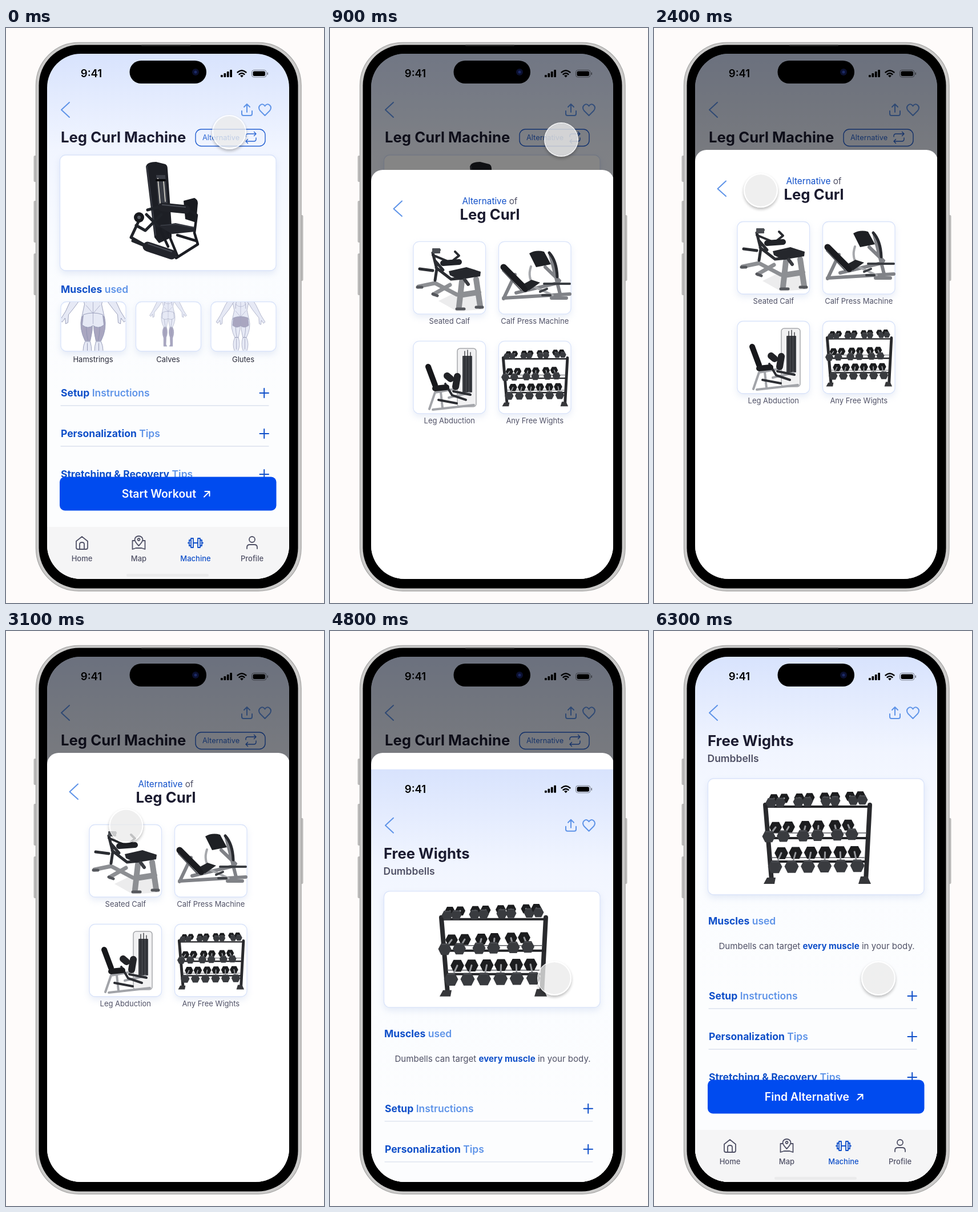
An HTML page for the animation above (6.4 s loop, 557 px wide and 1005 px high).

```html
<!DOCTYPE html>
<html lang="en">
<head>
<meta charset="utf-8">
<title>Workout app</title>
<style>
html, body { margin: 0; width: 100%; height: 100%; overflow: hidden; background: #fefbfa; }
svg { display: block; width: 557px; height: 1005px; font-family: Inter, Roboto, sans-serif; }
.line { fill: none; stroke-linecap: round; stroke-linejoin: round; }
.card { fill: #fff; stroke: #dae4fa; stroke-width: 1.3; filter: drop-shadow(0 5px 6px #6f8fd029); }
#touch {
  position: absolute; left: -30px; top: -30px; width: 60px; height: 60px; box-sizing: border-box;
  border: 2px solid #fffd; border-radius: 50%; background: #ebebebc8; background-clip: padding-box;
  box-shadow: 0 3px 5px #0004;
}
</style>
</head>
<body>
<svg id="stage" viewBox="0 0 557 1005"></svg>
<div id="touch"></div>
<script>
const INK = '#1b1b30', GREY = '#505166', BLUE = '#0f4fc9', SKY = '#5f94e8';

const text = (x, y, size, weight, fill, s, anchor = 'start') =>
  `<text x="${x}" y="${y}" font-size="${size}" font-weight="${weight}" fill="${fill}" text-anchor="${anchor}" xml:space="preserve">${s}</text>`;
const line = (d, color, w = 2) =>
  `<path class="line" d="${d}" stroke="${color}" stroke-width="${w}"/>`;
const shape = (d, fill) => `<path d="${d}" fill="${fill}"/>`;
const rect = (x, y, w, h, r, fill, more = '') =>
  `<rect x="${x}" y="${y}" width="${w}" height="${h}" rx="${r}" fill="${fill}" ${more}/>`;
const card = (x, y, w, h) =>
  `<rect class="card" x="${x}" y="${y}" width="${w}" height="${h}" rx="10"/>`;
const duo = (x, y, a, b) =>
  text(x, y, 17.5, 600, SKY, `<tspan font-weight="700" fill="${BLUE}">${a}</tspan> ${b}`);
const at = (x, y, s, body) => `<g transform="translate(${x} ${y}) scale(${s})">${body}</g>`;

function header() {
  const bars = [4, 7, 10, 13].map((h, i) => rect(376 + i * 5.4, 86 - h, 3.8, h, 1, '#000')).join('');
  return rect(72, 45, 425, 919, 0, 'url(#sky)') +
    text(149.5, 86, 18.6, 600, '#000', '9:41', 'middle') + bars +
    line('M405.5 77.5q7.5-6.5 15 0M408.5 81q4.5-3.8 9 0', '#000', 2.4) +
    shape('M413 86.5l-3-3.2q3-2 6 0z', '#000') +
    rect(430.5, 73.5, 25.5, 12.5, 4, 'none', 'stroke="#000" stroke-opacity=".45"') +
    rect(432.5, 75.5, 21.5, 8.5, 2.5, '#000') + rect(457.5, 77.5, 1.5, 4.5, 1, '#0008') +
    line('M111 130L97 143L111 156', SKY) +
    line('M413 145v5q0 3 3 3h12q3 0 3-3v-5M422 147V133M417 138l5-5 5 5', SKY) +
    line('M453.5 153L445 144.5Q441 139 445 135Q450 131 453.5 136.5Q457 131 462 135Q466 139 462 144.5Z', SKY);
}

function navItem(x, label, icon, color) {
  return at(x, 900, 1, line(icon, color, 1.8)) + text(x, 931.5, 13, 500, color, label, 'middle');
}

function footer(label, arrowX) {
  const rows = [['Setup', 'Instructions'], ['Personalization', 'Tips'], ['Stretching &amp; Recovery', 'Tips']]
    .map(([a, b], i) => {
      const y = 638 + 71 * i;
      return duo(96, y + 6, a, b) + line(`M444.5 ${y}h15.5M452.2 ${y - 8}v16`, BLUE) +
        line(`M96 ${y + 22}H460`, '#dce2ee', 1.3);
    }).join('');
  return rows + rect(94, 784.5, 379.5, 59, 9, '#004bef') +
    text(arrowX - 14, 821, 19.4, 600, '#fff', label, 'end') +
    line(`M${arrowX} 819.5l9.5-9.5M${arrowX + 1.5} 810h8v8`, '#fff', 2) +
    rect(72, 872, 425, 92, 0, '#f5f5f6') +
    navItem(133, 'Home', 'M-10-3L0-11 10-3V8q0 3-3 3H-7q-3 0-3-3zM-4 11V2q0-3 4-3t4 3v9', GREY) +
    navItem(232.5, 'Map', 'M-7-4h-4V11L-5 9 5 9 11 11V-4H7M0 5Q-7-2-7-6A7 6 0 0 1 7-6Q7-2 0 5ZM-2-6a2 2 0 1 0 4 0a2 2 0 1 0-4 0', GREY) +
    navItem(332, 'Machine', 'M-4 0H4M-8-8h4V8h-4zM4-8h4V8H4zM-11-5h3V5h-3zM8-5h3V5H8zM-13 0h2M11 0h2', BLUE) +
    navItem(431, 'Profile', 'M-5-6a5 5 0 1 0 10 0a5 5 0 1 0-10 0M-9 10V8q0-5 5-5H4q5 0 5 5v2', GREY) +
    rect(211, 954, 144, 5, 2.5, '#ebebec');
}

// Body seen from shoulders to feet, hips at the origin; one muscle is tinted.
function body(tinted) {
  const part = (name, d) =>
    `<path d="${d}" fill="${name === tinted ? '#a9a6c0' : '#e6e9f5'}" stroke="#9499b6" stroke-width=".9"/>`;
  const half = part('arm', 'M20-58Q38-32 48-8L58 8 54 11 49 4 48 14 44 12 43-2Q26-22 16-40Z') +
    part('thigh', 'M1 6Q12-6 20 2Q25 22 14 44H5Q0 26 1 6Z') +
    part('calf', 'M5 45Q0 62 6 76L7 98 4 104H14V78Q21 60 14 45Z') +
    line('M10 4Q14 22 9 43M10 48L10 72M5-50Q13-38 12-24', '#8e92b0', .9);
  return part('torso', 'M-24-62L-15-20-20 3Q0 13 20 3L15-20 24-62Z') +
    half + `<g transform="scale(-1 1)">${half}</g>` +
    part('glute', 'M-17-2Q0-8 17-2L19 16Q9 24 0 17Q-9 24-19 16Z') +
    line('M0-60V14M-12-34Q0-22 12-34M-12-18L0-4 12-18', '#a2a6c2', .8);
}

function muscle(x, label, figX, hipY, size, tinted) {
  const id = 'clip' + label;
  return card(x, 478.5, 114, 86.5) +
    `<clipPath id="${id}"><rect x="${x + 1}" y="479" width="112" height="85" rx="9"/></clipPath>` +
    `<g clip-path="url(#${id})">${at(figX, hipY, size, body(tinted))}</g>` +
    text(x + 56.5, 584, 13, 400, '#2a2b3a', label, 'middle');
}

function legCurl() {
  return shape('M245 242Q247 234 263 234L279 238Q283 240 283 246L290 345V366L268 376 260 366Z', '#1d1f25') +
    shape('M263 257h16l4 52h-16z', '#3a3d45') +
    line('M266 263L270 306M276 268L279 303', '#cfcdc4', 1.8) + line('M264 266h14', '#08090b', 4) +
    line('M247 242L262 362', '#373a43', 2) +
    line('M236 330L219 366 242 379M246 326L266 346M222 372L244 381M272 326L244 354 228 345M248 318L270 312', '#202329', 5) +
    `<circle cx="233" cy="331" r="9" fill="#17191e"/><circle cx="233" cy="331" r="3" fill="#555962"/>` +
    shape('M311 302L330 297Q336 300 336 306L333 340 314 334Z', '#191b20') +
    line('M320 318L334 327 330 358 336 378 298 402M283 356L301 400M270 352L284 382M300 362L333 372', '#1b1d23', 4.5) +
    shape('M267 346L297 341 331 348 330 356 291 360Z', '#24262d') +
    line('M271 345L298 343 329 349', '#484c56', 1.2) +
    line('M274 313L315 317', '#202228', 15) + line('M274 309L314 313', '#484b54', 2) +
    line('M248 382L290 396', '#22242b', 17) + line('M249 377L290 391', '#474a53', 2);
}

function rack() {
  const hex = (x, y, r, c) =>
    shape(`M${x - r} ${y}l${r * .45} ${-r * .85}h${r * 1.1}l${r * .45} ${r * .85}l${-r * .45} ${r * .9}h${-r * 1.1}z`, c);
  let out = line('M3 22L14 154M186 22L179 154', '#292a2d', 8) +
    shape('M0 160l6-11h15l-2 11zM166 160l4-13h12l6 13z', '#36373a') +
    line('M4 25H186M8 80H182M14 121H178', '#242528', 4) +
    line('M8 71H180M14 114H176', '#595b60', 1.5);
  // Each end: x, y, step inside a pair, step between pairs
  const rows = [
    { n: 8, back: [18, 11, 18, 44.5], front: [13, 18, 16, 48], r: 9.5, lift: -5 },
    { n: 6, back: [21, 61, 23, 52], front: [9, 77, 25.5, 60], r: 11.5, lift: -4 },
    { n: 6, back: [31, 106, 25, 51.6], front: [20, 130, 29, 57.6], r: 12.5, lift: -2 }
  ];
  for (const { n, back, front, r, lift } of rows)
    for (let i = 0; i < n; i++) {
      const [[bx, by], [fx, fy]] = [back, front].map(([x, y, step, pair]) =>
        [x + step * (i % 2) + pair * (i >> 1), y + lift * i / (n - 1)]);
      out += hex(bx, by, r * .95, '#1c1d1f') + line(`M${bx} ${by}L${fx} ${fy}`, '#96989c', 3) +
        hex(fx, fy, r, '#393b3f') + line(`M${fx - r * .5} ${fy - r * .7}h${r}`, '#5a5c61', 1);
    }
  return out;
}

function seatedCalf() {
  return shape('M190 442L225 425 262 428 268 457 222 460Z', '#ececed') +
    line('M155 417L184 411 222 431M182 430L210 414', '#8d8f93', 7) +
    line('M231 408L226 452M256 404L263 451M228 432L260 427', '#8d8f93', 10) +
    line('M222 456h13M256 453h11M153 418h8M180 430l8 3', '#55575c', 5) +
    line('M180 358L187 386 184 406M186 384L212 404 234 402M157 386L180 389M184 372L198 388', '#2a2c31', 5) +
    line('M180 362L204 372M216 371L226 363 219 356M181 354L192 353', '#292b30', 4) +
    line('M198 376L226 374', '#202227', 10) +
    shape('M208 390L239 383 264 391 263 399 226 405 210 397Z', '#25272c') +
    line('M236 405L242 413', '#3a3c41', 6) +
    rect(179, 350, 14, 9, 1, '#4b4e53');
}

function calfPress() {
  return line('M304 438L324 396M304 437L420 430M326 428L398 411M386 362L403 430M377 383L402 407M388 437H414', '#808287', 6) +
    line('M352 382Q345 402 359 418L390 432', '#a6a8ac', 4) +
    line('M384 358Q397 372 398 400', '#292b30', 5) +
    line('M304 383L342 421', '#1b1c20', 11) + line('M302 389L335 424', '#53565b', 2) +
    shape('M340 412L353 405 368 410 348 424Z', '#222428') +
    shape('M349 359Q361 352 375 356L387 378 361 383Z', '#1e2024') +
    line('M375 412H420M368 426l12-5M372 432h14', '#3b3e43', 4);
}

function legAbduction() {
  return rect(223, 525, 33, 102, 5, '#f1f1f2', 'stroke="#a6a8ac" stroke-width="1.5"') +
    rect(232, 538, 17, 64, 1, '#3f4146') + line('M236 530V600M241 528V602M246 532V600', '#202227', 1.2) +
    line('M174 631L184 602 218 596M180 632L252 624M194 601L197 629M208 611L244 603', '#a2a4a9', 4) +
    line('M202 587L214 607 238 615M190 615L222 621M216 600L246 606', '#2c2e33', 4) +
    line('M172 557L184 589', '#16171a', 10) + line('M184 595L204 593', '#1b1c1f', 10) +
    line('M205 573L211 578M223 574L220 592', '#222327', 12);
}

function machinePage() {
  return header() + text(96, 200, 25.7, 700, INK, 'Leg Curl Machine') +
    rect(332, 177, 122, 29.5, 10, 'none', 'stroke="#2460d2" stroke-width="1.4"') +
    text(344, 196, 12.8, 400, '#2b66d4', 'Alternative') +
    line('M420 190v-1q0-4 4-4h14M434.5 181.5l3.5 3.5-3.5 3.5M438 192v2q0 4-4 4H420M423.5 194.5L420 198l3.5 3.5', '#2b66d4', 1.4) +
    card(94.5, 222, 378.5, 202) + legCurl() + duo(96, 463, 'Muscles', 'used') +
    muscle(96, 'Hamstrings', 152.5, 503, 1, 'thigh') +
    muscle(227.5, 'Calves', 284, 498, .56, 'calf') +
    muscle(359, 'Glutes', 411, 508, .74, 'glute') +
    footer('Start Workout', 347);
}

function weightsPage() {
  return header() + text(94, 201, 25.7, 700, INK, 'Free Wights') +
    text(93.5, 229, 17.5, 600, GREY, 'Dumbbells') +
    card(94.5, 258, 378.5, 203) + at(192, 282, 1, rack()) + duo(95, 513, 'Muscles', 'used') +
    text(285, 556, 15.1, 400, GREY,
      `Dumbells can target <tspan font-weight="700" fill="${BLUE}">every muscle</tspan> in your body.`, 'middle') +
    footer('Find Alternative', 356);
}

function sheet() {
  const option = (x, y, label, photo) =>
    card(x, y, 126.5, 126.5) + photo + text(x + 63.3, y + 143.5, 13, 400, GREY, label, 'middle');
  return rect(72, 213, 425, 1000, 20, '#fff') + line('M126 267.5L111.5 281 126 294', SKY) +
    text(280, 273, 15.3, 400, GREY, `<tspan fill="${BLUE}">Alternative</tspan> of`, 'middle') +
    text(280, 300, 25.7, 700, INK, 'Leg Curl', 'middle') +
    option(146, 338.5, 'Seated Calf', seatedCalf()) +
    option(295.5, 338.5, 'Calf Press Machine', calfPress()) +
    option(146, 512.5, 'Leg Abduction', legAbduction()) +
    option(295.5, 512.5, 'Any Free Wights', at(301.5, 528, .615, rack()));
}

const stage = document.getElementById('stage');
stage.innerHTML = `<defs>
  <linearGradient id="sky" gradientUnits="userSpaceOnUse" x1="0" y1="45" x2="0" y2="640">
    <stop stop-color="#d8e3fd"/><stop offset=".28" stop-color="#f1f5ff"/>
    <stop offset=".6" stop-color="#fafcff"/><stop offset="1" stop-color="#fcfdfe"/>
  </linearGradient>
  <clipPath id="screen"><rect x="72" y="45" width="424" height="918" rx="59"/></clipPath></defs>` +
  [[223, 46], [302, 73], [394, 73]].map(([y, h]) => rect(48.5, y, 6, h, 2, '#bab9b8')).join('') +
  rect(514, 327, 6.5, 115, 2, '#bab9b8') +
  rect(52.5, 25.5, 464.5, 958.5, 75, '#cccbca', 'stroke="#adacab" stroke-width="1.5"') +
  rect(57.5, 29.5, 454, 950, 71, '#000') + rect(237, 29.5, 86, 2, 1, '#292929') +
  `<g clip-path="url(#screen)">${machinePage()}
    <rect id="dim" x="72" y="45" width="425" height="919"/>
    <g id="sheet">${sheet()}</g><g id="weights">${weightsPage()}</g></g>` +
  rect(216.5, 57, 134.5, 40, 20, '#000') +
  `<circle cx="332" cy="77" r="6" fill="#0b1030"/><circle cx="332" cy="77" r="2.5" fill="#1c2a66"/>`;

const [dim, sheetEl, weightsEl, touch] =
  ['dim', 'sheet', 'weights', 'touch'].map(id => document.getElementById(id));

// Critically damped spring: 1 before the start, settling to 0.
function spring(t, start) {
  const x = Math.max(0, t - start) * .0203;
  return (1 + x) * Math.exp(-x);
}

// Touch stops: time, x, y
const stops = [[0, 391, 182], [500, 405, 195], [1400, 405, 195], [2400, 187, 284],
  [3000, 205, 340], [3900, 361, 355], [4450, 393, 607], [6400, 393, 607]];

function touchAt(t) {
  const i = stops.findIndex(s => s[0] > t);
  const [a, b] = [stops[i - 1], stops[i]];
  const p = (t - a[0]) / (b[0] - a[0]), e = p * p * (3 - 2 * p);
  return [a[1] + (b[1] - a[1]) * e, a[2] + (b[2] - a[2]) * e];
}

const slide = (el, y) => el.setAttribute('transform', `translate(0 ${y})`);

function draw(now) {
  const t = now % 6400, open = spring(t, 663);
  dim.setAttribute('opacity', .5 * (1 - open));
  slide(sheetEl, 751 * open);
  slide(weightsEl, 919 * spring(t, 4658));
  const [x, y] = touchAt(t);
  touch.style.transform = `translate(${x}px, ${y}px)`;
}

const start = performance.now();
function tick() {
  draw(performance.now() - start);
  requestAnimationFrame(tick);
}
tick();
</script>
</body>
</html>
```
